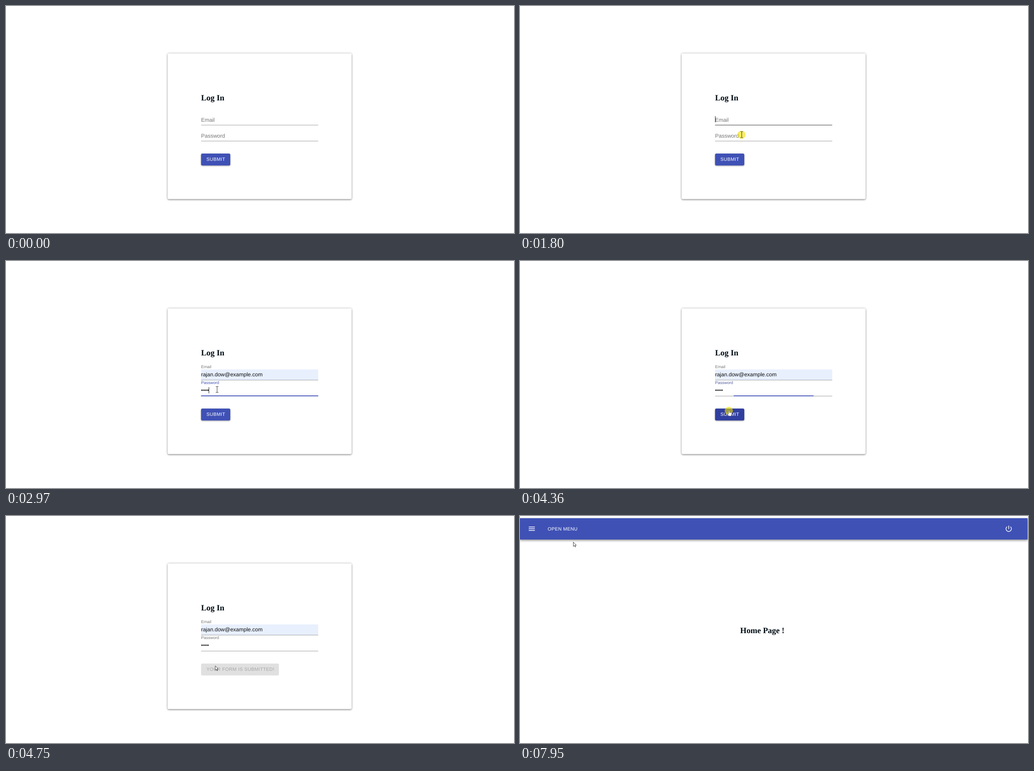
An HTML page that plays this animation: 1119 by 500 pixels, repeating every 8000 ms.

```html
<!DOCTYPE html>
<html lang="en">
<head>
<meta charset="utf-8">
<title>Log in form</title>
<style>
  html, body { margin: 0; width: 100%; height: 100%; overflow: hidden; background: #fff; }
  svg { display: block; width: 100%; height: 100%; }
  text { font-family: "Liberation Sans", Arial, sans-serif; font-size: 12px; text-rendering: geometricPrecision; white-space: pre; }
  .title { font: bold 17.9px "Liberation Serif", "Times New Roman", serif; fill: #000c14; }
  .caps { font-size: 10.45px; letter-spacing: .3px; fill: #fff; }
  .card { fill: #fff; filter: drop-shadow(0 2px 1.5px rgba(0,0,0,.25)) drop-shadow(0 0 2px rgba(0,0,0,.3)); }
  .raised { filter: drop-shadow(0 1.5px 1.5px rgba(0,0,0,.4)); }
  .bar { fill: #3f51b5; filter: drop-shadow(0 2px 2.5px rgba(0,0,0,.45)); }
  .icon { fill: none; stroke: #fff; stroke-width: 1.5; }
</style>
</head>
<body>
<svg viewBox="0 0 1119 500">
  <g id="login">
    <rect class="card" x="356" y="104.5" width="405.3" height="320.8" rx="3"/>
    <text class="title" x="429.7" y="208.3">Log In</text>
    <g id="email"></g>
    <g id="password"></g>
    <rect id="button" x="429.7" y="325" height="26.3" rx="3"/>
    <text id="caption" class="caps" x="441.6" y="341.4"></text>
  </g>
  <g id="home">
    <rect class="bar" x="0" y="4.8" width="1118" height="47"/>
    <path class="icon" d="M19.3 24.2h13.4M19.3 28h13.4M19.3 31.8h13.4"/>
    <text class="caps" x="61" y="31.8">OPEN MENU</text>
    <path class="icon" d="M1072.7 23.5a6 6 0 1 0 7.6 0M1076.5 21.3v7.4"/>
    <text class="title" x="485" y="258.3">Home Page !</text>
  </g>
  <circle id="click" r="9" fill="#f2e000" fill-opacity=".6"/>
  <g id="pointer">
    <path id="arrow" d="M.5 .5v9.4l2.2-1.9 1.6 3.4 1.5-.7-1.6-3.3h2.9z" fill="#fff" stroke="#333" stroke-width=".9"/>
    <path id="beam" d="M-2.8-6.6h2l.8.6.8-.6h2M0-6v12M-2.8 6.6h2l.8-.6.8.6h2" fill="none" stroke="#333"/>
    <path id="hand" d="M-1 0q1-1 1.9 0v4l4 .8q1.2.5 1 1.8l-.8 3.6-1 1.8h-4.2l-3.2-4.6q0-1.6 1.4-.9l.9.9z" fill="#fff" stroke="#333" stroke-width=".5"/>
  </g>
</svg>
<script>
const LOOP = 8000, LEFT = 429.7, WIDTH = 258;
const FOCUS_EMAIL = 1740, FILL = 1880, FOCUS_PASS = 2170, BLUR = 4336, SENT = 4530, HOME = 6380;
const KEYS = [2340, 2660, 2810, 2970];
const BLUE = [63, 81, 181], DARK_BLUE = [48, 63, 159], GREY = [117, 117, 117], DISABLED = [224, 224, 224];

// The screen refreshes in bursts: [first, last, count]
const BURSTS = [[410, 490, 2], [800, 1120, 5], [1180, 1430, 4], [1740, 2110, 6], [2170, 2340, 3],
  [2660, 2660, 1], [2810, 2810, 1], [2970, 2970, 1], [3510, 3510, 1], [3690, 4360, 10], [4440, 4440, 1],
  [4530, 4750, 4], [6380, 6380, 1], [7090, 7240, 3], [7470, 7950, 7]];
const ticks = [0];
for (const [a, b, n] of BURSTS)
  for (let i = 0; i < n; i++) ticks.push(n > 1 ? Math.round(a + (b - a) * i / (n - 1)) : a);

// Pointer path: [time, x, y]
const PATH = [[410, 832, 378], [490, 743, 339], [725, 743, 339], [1120, 500, 266], [1430, 480, 260],
  [1665, 480, 260], [1888, 505, 329], [1962, 505, 329], [2110, 468.5, 277], [2340, 465, 283],
  [3615, 465, 283], [4215, 460.5, 329.5], [7015, 460.5, 329.5], [7240, 166.5, 136], [7395, 166.5, 136], [7950, 117, 57]];

const $ = id => document.getElementById(id);
const set = (el, attrs) => { for (const k in attrs) el.setAttribute(k, attrs[k]); };
const show = (el, on) => { el.style.display = on ? "" : "none"; };
const clamp = x => Math.max(0, Math.min(1, x));
const mix = (a, b, u) => a + (b - a) * u;
const blend = (a, b, u) => `rgb(${a.map((v, i) => Math.round(mix(v, b[i], u)))})`;
const ease = (t, start, length = 200) => 1 - (1 - clamp((t - start) / length)) ** 3;
const within = (t, a, b) => t >= a && t < b;
const pulse = (t, a, b) => ease(t, a) - ease(t, b);

function add(parent, tag, attrs) {
  const el = document.createElementNS("http://www.w3.org/2000/svg", tag);
  set(el, attrs);
  return parent.appendChild(el);
}

function makeField(id, name, y, focus, blur, hovers) {
  const g = $(id);
  const fill = add(g, "rect", { x: LEFT, y: y - 23.3, width: WIDTH, height: 23.3, fill: "#e8f0fe" });
  const line = add(g, "rect", { x: LEFT, width: WIDTH });
  const accent = add(g, "rect", { y: y - 1, height: 1.8, fill: "#3f51b5" });
  const label = add(g, "text", {});
  const value = add(g, "text", { x: LEFT, y: y - 8.3, fill: "#111" });
  const caret = add(g, "rect", { y: y - 19.3, width: 1, height: 13.5, fill: "#111" });
  label.textContent = name;
  show(fill, false);

  function update(t) {
    const active = pulse(t, focus, blur), up = ease(t, focus);
    const hover = hovers.reduce((sum, [a, b]) => sum + pulse(t, a, b), 0);
    const thick = hovers.some(([a, b]) => within(t, a, b)) && !within(t, focus, blur);
    set(line, { y: thick ? y - 1 : y - .2, height: thick ? 1.6 : .9, fill: `rgba(0,0,0,${mix(.42, .87, hover)})` });
    set(accent, { x: LEFT + WIDTH * (1 - active) / 2, width: WIDTH * active });
    set(label, {
      transform: `translate(${LEFT} ${mix(y - 7.2, y - 26, up)}) scale(${mix(1, .75, up)})`,
      fill: blend(GREY, BLUE, active)
    });
  }
  return { g, fill, value, caret, update };
}

const email = makeField("email", "Email", 262, FOCUS_EMAIL, FOCUS_PASS, [[1330, 1790]]);
const pass = makeField("password", "Password", 297.2, FOCUS_PASS, BLUR, [[960, 1110], [2090, 3800]]);
const dots = KEYS.map((k, i) => add(pass.g, "circle", { cx: 431.9 + 4.3 * i, cy: 284.6, r: 1.6, fill: "#111" }));

function pointerAt(t) {
  const next = PATH.findIndex(p => p[0] > t);
  if (next < 0) return PATH[PATH.length - 1].slice(1);
  if (next === 0) return PATH[0].slice(1);
  const [a, b] = [PATH[next - 1], PATH[next]], u = (t - a[0]) / (b[0] - a[0]);
  return [mix(a[1], b[1], u), mix(a[2], b[2], u)];
}

function drawFields(t) {
  email.update(t);
  pass.update(t);
  const filled = t >= FILL;
  show(email.fill, filled);
  email.value.textContent = filled ? "rajan.dow@example.com" : "";
  set(email.caret, { x: filled ? 564.8 : LEFT });
  show(email.caret, within(t, FOCUS_EMAIL, FOCUS_PASS));

  const typed = KEYS.filter(k => t >= k).length;
  dots.forEach((dot, i) => show(dot, i < typed));
  const since = t - (typed ? KEYS[typed - 1] : FOCUS_PASS);
  set(pass.caret, { x: LEFT + 4.25 * typed - .3 });
  show(pass.caret, within(t, FOCUS_PASS, BLUR) && Math.floor(since / 530) % 2 === 0);
}

function drawButton(t) {
  const sent = t >= SENT;
  set($("button"), {
    width: sent ? 171.5 : 64.3,
    class: sent ? "" : "raised",
    fill: sent ? blend(DARK_BLUE, DISABLED, ease(t, SENT)) : blend(BLUE, DARK_BLUE, ease(t, 4150))
  });
  $("caption").textContent = sent ? "YOUR FORM IS SUBMITTED!" : "SUBMIT";
  $("caption").style.fill = sent ? "rgba(0,0,0,.26)" : "#fff";
}

function drawPointer(t) {
  const [x, y] = pointerAt(t);
  const inField = t < HOME && within(x, LEFT, LEFT + WIDTH) && (within(y, 239, 262.5) || within(y, 274, 298));
  const onButton = t < SENT && within(x, 430, 494) && within(y, 325, 351);
  show($("pointer"), t >= PATH[0][0]);
  set($("pointer"), { transform: `translate(${x} ${y})` });
  show($("beam"), inField);
  show($("hand"), onButton);
  show($("arrow"), !inField && !onButton);
  set($("click"), { cx: x - .5, cy: y + .5 });
  show($("click"), within(t, 1740, 1800) || within(t, 2170, 2240) || within(t, BLUR, 4430));
}

function render(time) {
  const t = ticks.filter(k => k <= time).pop();
  show($("login"), t < HOME);
  show($("home"), t >= HOME);
  drawFields(t);
  drawButton(t);
  drawPointer(t);
}

const start = performance.now();
function frame(now) {
  render(Math.max(0, now - start) % LOOP);
  requestAnimationFrame(frame);
}
render(0);
requestAnimationFrame(frame);
</script>
</body>
</html>
```
